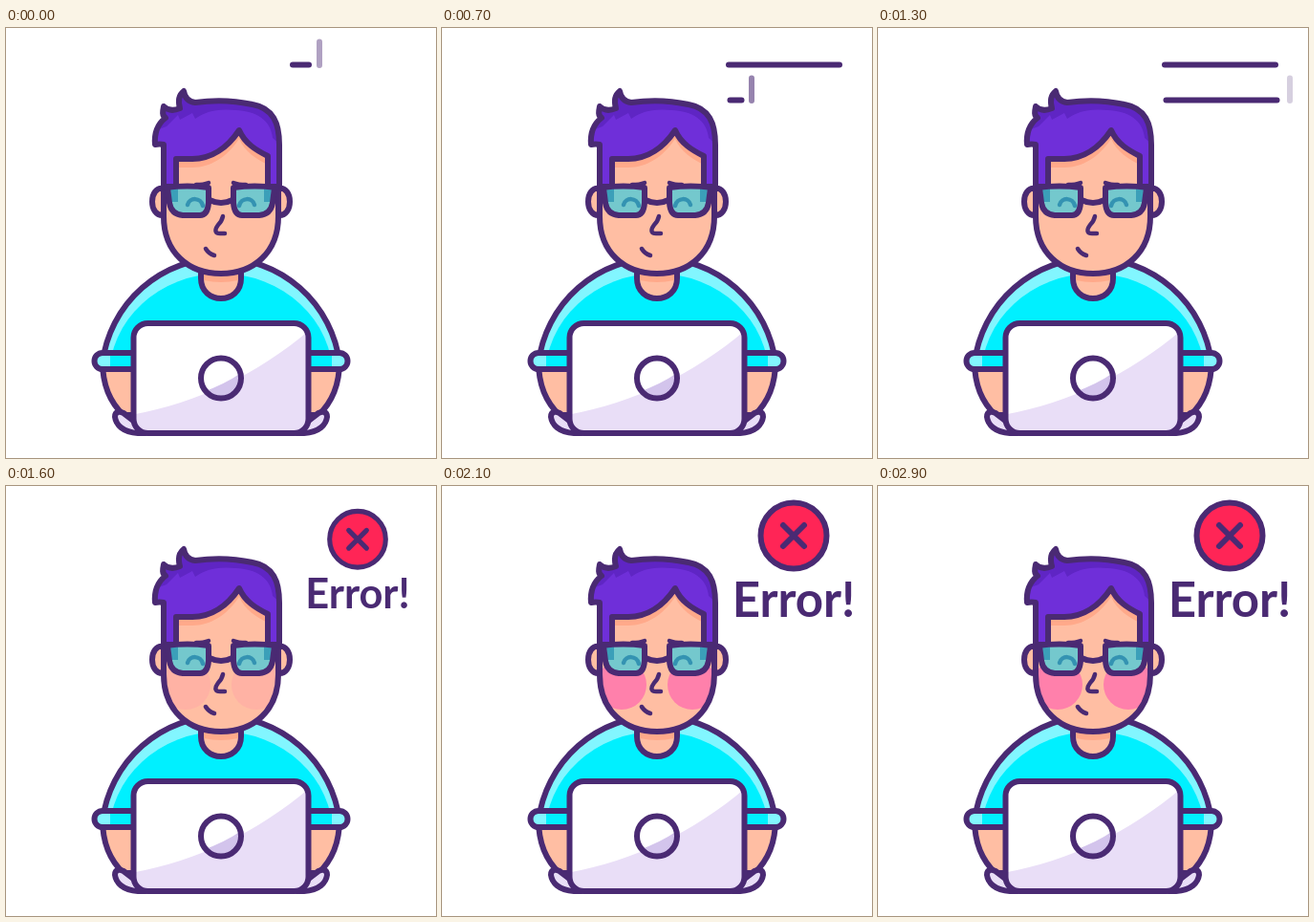
Recreate the animation shown at these times as an HTML page. Size 450 px wide and 450 px high, loop 3 s.

```html
<!DOCTYPE html>
<html lang="en">
<head>
<meta charset="utf-8">
<title>Error at the laptop</title>
<style>
  html, body { margin: 0; width: 100%; height: 100%; overflow: hidden; background: #fff; }
  svg { display: block; width: 100vw; height: 100vh; }
  .ink { stroke: #4a2a73; stroke-width: 6; stroke-linecap: round; stroke-linejoin: round; }
  .thin { stroke-width: 4.5; }
  .line { fill: none; }
  .skin { fill: #ffbea3; }
  .shade { fill: #ffa98a; }
  .label { font: 700 51px Lato, Inter, sans-serif; fill: #4a2a73; text-anchor: middle; }
</style>
</head>
<body>
<svg viewBox="0 0 450 450">
  <defs>
    <path id="face" d="M165 125V197C165 235 191 257 225 257S285 235 285 197V125L245 95Z"/>
    <path id="torso" d="M101 350A125 125 0 0 1 349 350Z"/>
    <path id="hair" d="M165 166V122Q161 121 156 122C155 111 158 101 167 94C163 92 164 87 165 82C169 86 175 87 182 84C180 77 181 70 186 66C187 73 191 77 198 78C218 75 240 76 258 80C280 84 286 100 286 122V166H274V134C262 128 250 121 244 107C232 125 215 137 195 137H178V166Z"/>
    <rect id="lid" x="133.5" y="309" width="183" height="115" rx="15"/>
    <circle id="disc" cx="225" cy="366.500" r="21"/>
    <path id="hand" class="ink" fill="#e9def7" d="M146 424H138C122 423 115 415 114 407C114 401 119 401 123 403L140 416"/>
    <path id="ear" class="ink skin" d="M165 168C149 165 149 198 165 196"/>
    <g id="lens">
      <path fill="#74c8cd" d="M169 166.500H212V183Q211 196 203 196H185Q173 195 171 183Z"/>
      <path fill="#3b9fb9" d="M172 168H180V182H173Z"/>
      <path class="line" stroke="#3493b2" stroke-width="4.5" stroke-linecap="round" d="M190 185C192 177 204 177 206 186"/>
      <path class="ink line" d="M167 167Q190 164 212 167V183Q211 196 203 196H185Q173 195 171 183L169 167"/>
      <path class="ink line thin" d="M199 164Q207 164 212 162"/>
    </g>
    <clipPath id="inFace"><use href="#face"/></clipPath>
    <clipPath id="inTorso"><use href="#torso"/></clipPath>
    <clipPath id="inHair"><use href="#hair"/></clipPath>
    <clipPath id="inLid"><use href="#lid"/></clipPath>
    <clipPath id="inDisc"><use href="#disc"/></clipPath>
  </defs>

  <!-- arms and shirt -->
  <path class="ink skin" d="M101 349C101 372 108 391 123 405H327C342 391 349 372 349 349Z"/>
  <use href="#torso" fill="#82f6ff"/>
  <ellipse cx="225" cy="365" rx="117" ry="108" fill="#00f0ff" clip-path="url(#inTorso)"/>
  <use href="#torso" class="ink line"/>
  <rect class="ink" x="92.5" y="340" width="265" height="17" rx="8.5" fill="#82f6ff"/>
  <path fill="#00f0ff" d="M109 343H341V354H109Z"/>
  <path class="ink skin" d="M204 246V262C204 290 246 290 246 262V246Z"/>
  <path class="shade" d="M207 250H243V264Q225 268 207 264Z"/>

  <!-- head -->
  <use href="#ear"/>
  <use href="#ear" transform="matrix(-1 0 0 1 450 0)"/>
  <use href="#face" class="skin"/>
  <g clip-path="url(#inFace)">
    <use href="#hair" class="shade" y="9"/>
    <g id="blush" fill="#ff80ab">
      <circle cx="188" cy="208" r="26"/>
      <circle cx="262" cy="208" r="26"/>
    </g>
  </g>
  <use href="#face" class="ink line"/>
  <use href="#hair" fill="#6f2fd9"/>
  <path clip-path="url(#inHair)" fill="#5f25c4" d="M150 60H290V125L279 115C277 96 262 87 240 86C220 84 208 88 198 95L195 89L182 96L180 91L168 103L160 106L158 125H150Z"/>
  <use href="#hair" class="ink line"/>
  <use href="#lens"/>
  <use href="#lens" transform="matrix(-1 0 0 1 450 0)"/>
  <path class="ink line" d="M213 180Q225 186 237 180"/>
  <path class="ink line thin" d="M227 197Q226 202 222 206C217 213 220 215 224 215H229M209 231Q212 236 218 238"/>

  <!-- laptop -->
  <use href="#hand"/>
  <use href="#hand" transform="matrix(-1 0 0 1 450 0)"/>
  <use href="#lid" fill="#fff"/>
  <path clip-path="url(#inLid)" fill="#e9def7" d="M130 405C200 393 265 362 320 314V430H130Z"/>
  <use href="#lid" class="ink line"/>
  <use href="#disc" fill="#fff"/>
  <path clip-path="url(#inDisc)" fill="#d3c4ec" d="M200 383Q230 373 250 358V390H200Z"/>
  <use href="#disc" class="ink line"/>

  <!-- typed lines, then the alert -->
  <g id="typing" class="ink line">
    <path id="row1"/>
    <path id="row2"/>
    <path id="cursor"/>
  </g>
  <g id="alert">
    <circle class="ink" cx="368" cy="52" r="34.5" fill="#ff2556"/>
    <path class="ink line" d="M357 41L379 63M379 41L357 63"/>
    <text class="label" x="368" y="136.5">Error!</text>
  </g>
</svg>
<script>
  const LOOP = 3000, STEP = 100, ERROR_AT = 1500, ROW2_AT = 700;
  const POP = [0.3, 0.85, 1.1, 1.025];
  const get = id => document.getElementById(id);
  const set = (id, name, value) => get(id).setAttribute(name, value);

  const row = (start, end, y, tip) =>
    tip > start ? `M${start} ${y}H${Math.min(end, tip)}` : "";

  function drawTyping(t) {
    const second = t >= ROW2_AT;
    const x1 = 328 + 0.18 * t;
    const x2 = Math.min(431, 324 + 0.214 * (t - ROW2_AT));
    set("row1", "d", row(300, 416, 38.5, x1 - 11));
    set("row2", "d", row(301.5, 417.5, 75.5, second ? x2 - 10.5 : 0));

    const blink = 0.42 + 0.3 * Math.cos((t - 120) / 500 * 2 * Math.PI);
    const waiting = t >= ROW2_AT - STEP && !second;
    set("cursor", "d", second ? `M${x2} 52.5V76` : `M${x1} 14.5V39`);
    set("cursor", "opacity", waiting ? 0 : blink);
  }

  function drawAlert(age) {
    const scale = POP[age / STEP] ?? 1;
    set("alert", "transform", `translate(368 77) scale(${scale}) translate(-368 -77)`);
    set("blush", "opacity", Math.min(1, age / 500));
  }

  function draw(t) {
    const failed = t >= ERROR_AT;
    set("typing", "visibility", failed ? "hidden" : "visible");
    set("alert", "visibility", failed ? "visible" : "hidden");
    set("blush", "visibility", failed ? "visible" : "hidden");
    if (failed) drawAlert(t - ERROR_AT);
    else drawTyping(t);
  }

  const begin = performance.now();
  function tick() {
    const t = (performance.now() - begin) % LOOP;
    draw(Math.floor(t / STEP) * STEP);
    requestAnimationFrame(tick);
  }
  tick();
</script>
</body>
</html>
```
